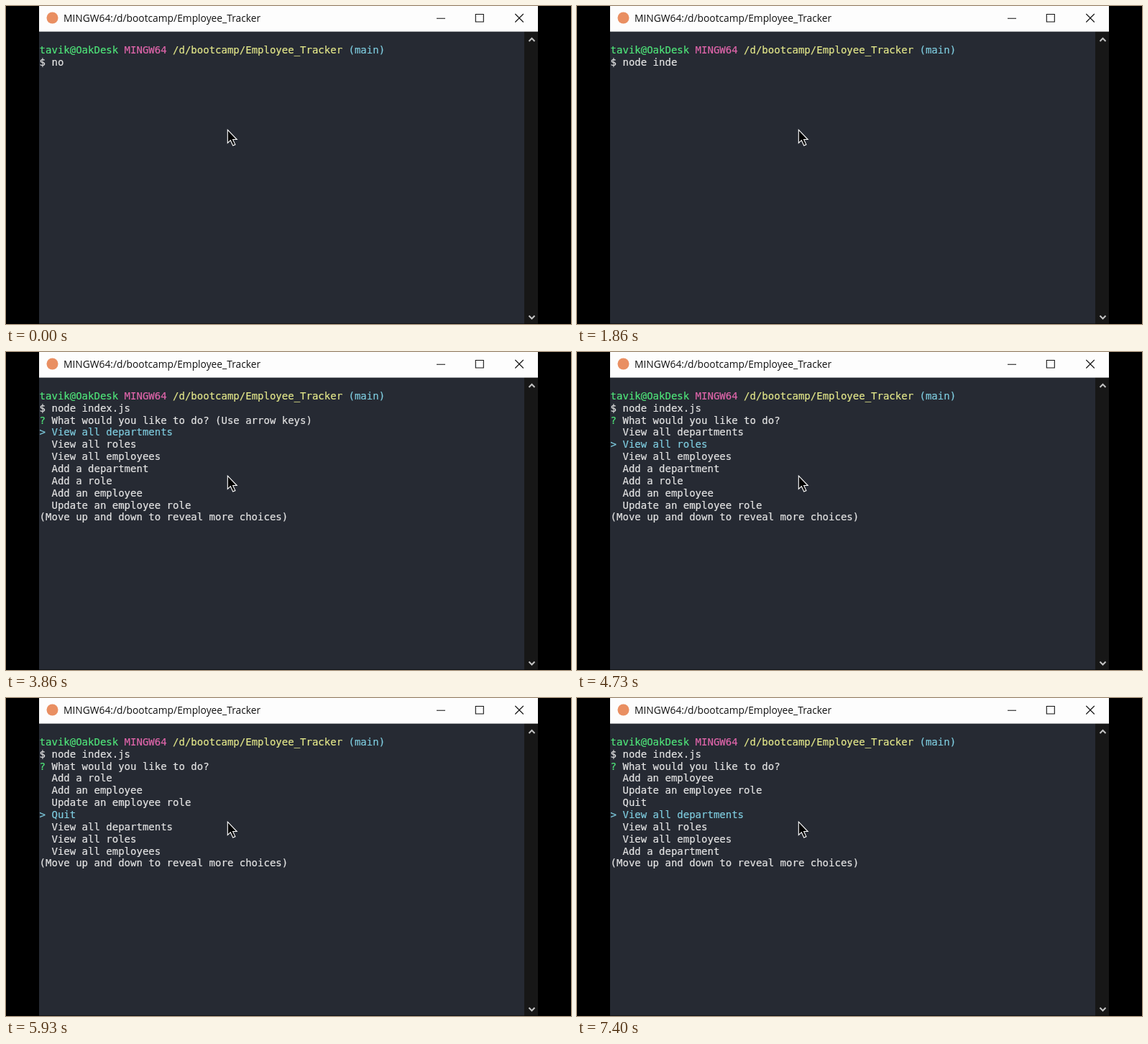
These frames come from a looping animation (786 by 442 pixels, 8000 ms). An HTML page:

```html
<!DOCTYPE html>
<html lang="en">
<head>
<meta charset="utf-8">
<title>Terminal menu</title>
<style>
  html, body { margin: 0; width: 100%; height: 100%; overflow: hidden; background: #000; }
  svg { display: block; width: 786px; height: 442px; }
  text { white-space: pre; }
  .title { font: 13.8px "Open Sans", "Noto Sans", sans-serif; fill: #111; }
  #screen { font: 14px "DejaVu Sans Mono", monospace; fill: #e4e4e4; stroke: #e4e4e4; stroke-width: .2; }
  #screen .green { fill: #4fe57a; stroke: #4fe57a; }
  #screen .pink { fill: #e066ab; stroke: #e066ab; }
  #screen .yellow { fill: #e3e78a; stroke: #e3e78a; }
  #screen .cyan { fill: #7fcde0; stroke: #7fcde0; }
  .button { fill: none; stroke: #111; stroke-width: 1.1; }
  .chevron { fill: none; stroke: #c4c4c4; stroke-width: 2; }
</style>
</head>
<body>
<svg viewBox="0 0 786 442">
  <rect x="46" y="35" width="675" height="406.5" fill="#262a33"/>
  <rect x="721" y="35" width="19" height="406.5" fill="#171717"/>
  <rect x="46" width="694" height="35.6" fill="#fdfdfd"/>
  <circle cx="64.5" cy="16.5" r="8" fill="#e98f62"/>
  <text class="title" x="80" y="22">MINGW64:/d/bootcamp/Employee_Tracker</text>
  <path class="button" d="M599 17.3h12M653.3 11.5h11v10.5h-11zM708.3 11l11.5 11.5M719.8 11l-11.5 11.5"/>
  <path class="chevron" d="M727.5 49l4-4 4 4M727.5 430.5l4 4 4-4"/>
  <g id="screen"></g>
  <path d="M308.3 172v18.5l4-3.8 3.4 7.3 3.2-1.4-3.3-7.1h5.6z" fill="#000" stroke="#fff" stroke-width="1.1"/>
</svg>
<script>
const LOOP = 8000;
const LEFT = 46.6, FIRST_LINE = 65.8, LINE_HEIGHT = 16.86;
const PAGE_SIZE = 7, POINTER_ROW = 3;

const command = "node index.js";
const choices = [
  "View all departments", "View all roles", "View all employees",
  "Add a department", "Add a role", "Add an employee",
  "Update an employee role", "Quit"
];

// Key times in ms; two letters are already typed when the loop begins.
const typedBefore = 2;
const keyTimes = [60, 260, 400, 600, 800, 1200, 1860, 2060, 2200, 2400, 2460];
const menuTime = 3200;
const downTimes = [4530, 4800, 5000, 5200, 5400, 5600, 5800, 6400];

const screen = document.getElementById("screen");
const countUntil = (times, t) => times.filter(time => time <= t).length;
const span = (color, text) => `<tspan class="${color}">${text}</tspan>`;

const prompt = [
  span("green", "tavik@OakDesk"),
  span("pink", "MINGW64"),
  span("yellow", "/d/bootcamp/Employee_Tracker"),
  span("cyan", "(main)")
].join(" ");

function menuLines(downs) {
  const pointer = Math.min(downs, POINTER_ROW);
  const top = downs - pointer;
  const hint = downs ? "" : " (Use arrow keys)";
  const rows = Array.from({ length: PAGE_SIZE }, (_, i) => {
    const label = choices[(top + i) % choices.length];
    return i === pointer ? span("cyan", "&gt; " + label) : "  " + label;
  });
  return [
    span("green", "?") + " What would you like to do?" + hint,
    ...rows,
    "(Move up and down to reveal more choices)"
  ];
}

function linesAt(t) {
  const typed = command.slice(0, typedBefore + countUntil(keyTimes, t));
  const lines = [prompt, "$ " + typed];
  return t < menuTime ? lines : lines.concat(menuLines(countUntil(downTimes, t)));
}

let shown = "";
function draw(now) {
  const markup = linesAt(now % LOOP).map((line, i) =>
    `<text x="${LEFT}" y="${(FIRST_LINE + i * LINE_HEIGHT).toFixed(2)}">${line}</text>`
  ).join("");
  if (markup !== shown) screen.innerHTML = shown = markup;
}

const start = performance.now();
function tick() {
  draw(performance.now() - start);
  requestAnimationFrame(tick);
}
tick();
</script>
</body>
</html>
```
